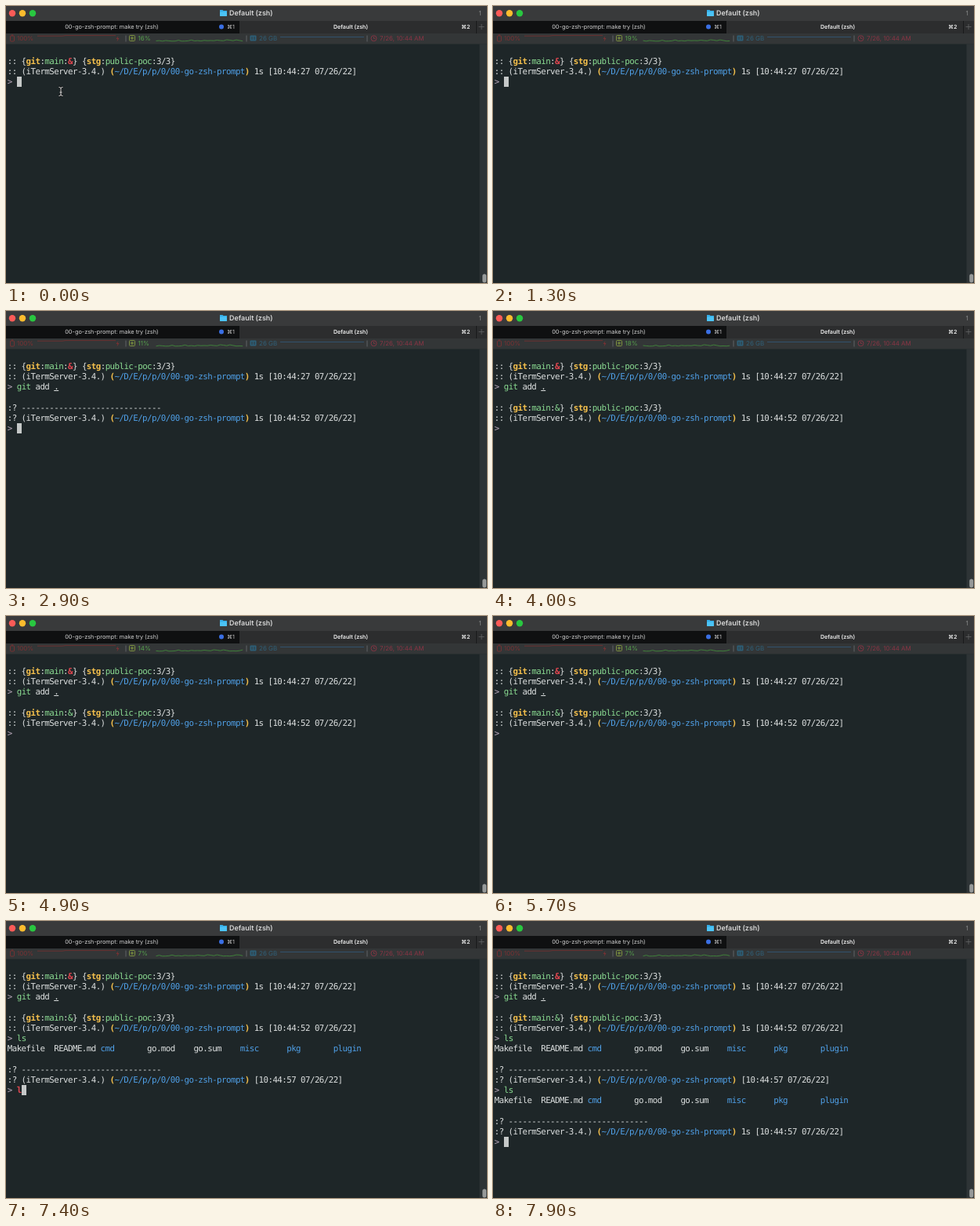
An HTML page for the animation above (8 s loop, 614 by 353 pixels).

```html
<!DOCTYPE html>
<html lang="en">
<head>
<meta charset="utf-8">
<title>Terminal</title>
<style>
html, body { margin: 0; width: 100%; height: 100%; overflow: hidden; background: #1e2628; }
svg { position: absolute; left: 0; top: 0; font-family: Inter, Roboto, sans-serif; text-rendering: geometricPrecision; }
pre {
  position: absolute; left: 1.8px; top: 64px; margin: 0; color: #dde0e0;
  font: 10.8px/13.2px "DejaVu Sans Mono", "Liberation Mono", monospace;
  letter-spacing: -.56px; text-rendering: geometricPrecision;
}
.y { color: #f5c04c; font-weight: bold }
.r { color: #e0454f; font-weight: bold }
.g { color: #8bdc92 } .b { color: #4f9fe6 } .p { color: #b9a9bb } .u { text-decoration: underline }
#cursor { position: absolute; width: 6px; height: 13px; background: #c5c8c8; }
</style>
</head>
<body>
<svg width="614" height="353" viewBox="0 0 614 353">
  <!-- title bar -->
  <rect width="614" height="19" fill="#393a3b"/>
  <circle cx="8" cy="9.2" r="4.2" fill="#fc5b57"/>
  <circle cx="21" cy="9.2" r="4.2" fill="#fdbc2e"/>
  <circle cx="34" cy="9.2" r="4.2" fill="#29c740"/>
  <path d="M273 5h3.5l1 1H282v7h-9z" fill="#35aee8"/>
  <rect x="273" y="7.5" width="9" height="5.5" rx="1" fill="#4cc3f5"/>
  <text x="285" y="12.2" font-size="8.95" font-weight="600" fill="#d9d9d9">Default (zsh)</text>
  <text x="603.5" y="12" font-size="8" fill="#8d8d8d">1</text>

  <!-- tabs -->
  <rect y="19" width="298" height="16" fill="#0f1011"/>
  <rect x="298" y="19" width="316" height="16" fill="#2c2d2e"/>
  <path d="M600.5 19v16" stroke="#191a1b"/>
  <path d="M603.5 26.5h7M607 23v7" stroke="#636465" stroke-width=".8"/>
  <g font-size="7.1">
    <text x="135" y="29.2" font-size="7.35" text-anchor="middle" fill="#cecece">00-go-zsh-prompt: make try (zsh)</text>
    <text x="440" y="29.2" text-anchor="middle" font-weight="600" fill="#f0f0f0">Default (zsh)</text>
    <text x="282" y="29.2" fill="#c4c4c4">⌘1</text>
    <text x="581" y="29.2" font-weight="600" fill="#f0f0f0">⌘2</text>
  </g>
  <circle cx="275" cy="26.5" r="3" fill="#3a6fe4"/>

  <!-- status bar -->
  <rect y="35" width="614" height="13.5" fill="#333637"/>
  <path d="M153 37.5v8M307 37.5v8M461 37.5v8" stroke="#666a6b" stroke-width=".9"/>
  <g font-size="8">
    <rect x="5.5" y="38" width="5" height="7" rx="1" fill="none" stroke="#7b3133" stroke-width=".9"/>
    <g fill="#7b3133">
      <rect x="6.8" y="36.5" width="2.4" height="1"/>
      <text x="14" y="44.4">100%</text>
      <path d="M143.5 38l-3 4h2l-1 3.5 3-4.5h-2z"/>
    </g>
    <path d="M40 38.2H72L76 37.6H140" fill="none" stroke="#7a3030" stroke-width=".8"/>
    <g fill="none" stroke="#7f9440">
      <rect x="157.5" y="37.5" width="7" height="7" rx="1"/>
      <rect x="160" y="40" width="2" height="2"/>
    </g>
    <text id="cpu" x="168.5" y="44.4" fill="#55a04c"></text>
    <path id="graph" fill="none" stroke="#418a3c" stroke-width=".9"/>
    <rect x="311.5" y="37.5" width="8" height="7" rx="1" fill="#2c5f78"/>
    <path d="M314 39v4M317 39v4" stroke="#333637"/>
    <text x="323" y="44.4" fill="#2f6079">26 GB</text>
    <path d="M350 39.5H457" stroke="#31597a" stroke-width=".8"/>
    <circle cx="469.5" cy="41.2" r="3.5" fill="none" stroke="#8b3545" stroke-width=".9"/>
    <path d="M469.5 39v2.5h1.8" fill="none" stroke="#8b3545" stroke-width=".8"/>
    <text x="477" y="44.4" font-size="7.9" fill="#8b3545">7/26, 10:44 AM</text>
  </g>

  <!-- scrollbar -->
  <rect x="604.5" y="48.5" width="9.5" height="304.5" fill="#2e3436"/>
  <rect x="608.2" y="341.5" width="5" height="11" rx="2.5" fill="#979a9a"/>
</svg>
<pre id="screen"></pre>
<div id="cursor"></div>
<svg id="mouse" width="614" height="353" fill="none">
  <path id="beam" d="M67.5 103.5q2.5 0 2.5 1.5q0-1.5 2.5-1.5M70 105v8M67.5 114.5q2.5 0 2.5-1.5q0 1.5 2.5 1.5M68.5 110h3" stroke-width="2.4" stroke="#111"/>
  <path d="M67.5 103.5q2.5 0 2.5 1.5q0-1.5 2.5-1.5M70 105v8M67.5 114.5q2.5 0 2.5-1.5q0 1.5 2.5 1.5M68.5 110h3" stroke="#ddd"/>
</svg>
<script>
const LOOP = 8000, CELL = 5.942, ROW = 13.2;
const $ = id => document.getElementById(id);
const paint = (cls, text) => `<span class="${cls}">${text}</span>`;

const waiting = ':? ' + '-'.repeat(30);
const status = amp => `:: {${paint('y', 'git')}:${paint('g', 'main')}:${paint(amp, '&amp;')}} ` +
  `{${paint('y', 'stg')}:${paint('g', 'public-poc')}:3/3}`;
const place = (mark, time, took = '1s ') => `${mark} (iTermServer-3.4.) ${paint('y', '(')}` +
  `${paint('b', '~/D/E/p/p/0/00-go-zsh-prompt')}${paint('y', ')')} ${took}[10:44:${time} 07/26/22]`;
const listing = ['Makefile', 'README.md', 'cmd', 'go.mod', 'go.sum', 'misc', 'pkg', 'plugin']
  .map(name => /^[a-z]+$/.test(name) ? paint('b', name.padEnd(10)) : name.padEnd(10)).join('');

// Each command: first key, key interval, enter, time of the next prompt.
const commands = [
  { text: 'git add .', start: 1400, step: 100, enter: 2400, done: 2600, out: [] },
  { text: 'ls', start: 6900, step: 100, enter: 7200, done: 7300, out: [listing] },
  { text: 'ls', start: 7400, step: 100, enter: 7600, done: 7700, out: [listing] }
];
const cpuSteps = [[0, 16], [1000, 19], [2000, 11], [3700, 18], [4700, 14], [6400, 8], [7200, 7]];

function highlight(typed, full) {
  const [name, ...args] = typed.split(' ');
  const cls = name === full.split(' ')[0] ? 'g' : 'r';
  const rest = args.map(a => a === '.' ? paint('u', a) : a);
  return [paint(cls, name), ...rest].join(' ');
}

function terminal(t) {
  const prompts = [
    [status('r'), place('::', 27)],
    t < 3800 ? [waiting, place(':?', 52)] : [status('g'), place('::', 52)],
    [waiting, place(':?', 57, '')],
    [waiting, place(':?', 57)]
  ];
  const rows = [];
  let col = 0;
  for (let i = 0; i < prompts.length; i++) {
    const cmd = commands[i];
    const count = cmd ? Math.max(0, Math.min(cmd.text.length, Math.floor((t - cmd.start) / cmd.step) + 1)) : 0;
    const typed = cmd ? cmd.text.slice(0, count) : '';
    rows.push(...prompts[i], paint('p', '&gt;') + ' ' + (typed && highlight(typed, cmd.text)));
    col = 2 + count;
    if (!cmd || t < cmd.enter) break;
    rows.push(...cmd.out, '');
    col = 0;
    if (t < cmd.done) break;
  }
  return { rows, col };
}

function cursorOn(t) {
  if (t < 1300) return t % 1000 < 500;
  if (t < 3000 || t >= 6900) return true;
  return (t + 900) % 1000 < 500;
}

function load(i) {
  const v = Math.abs(Math.sin(i * 12.9898) * 43758.5453) % 1;
  return v * v * 1.8;
}

function drawCpu(t) {
  const k = cpuSteps.filter(s => s[0] <= t).length - 1;
  $('cpu').textContent = cpuSteps[k][1] + '%';
  let d = '';
  for (let i = 0; i < 28; i++) {
    d += `${i ? 'L' : 'M'}${191.5 + i * 4.1} ${(44.8 - load(i + k + 5)).toFixed(1)}`;
  }
  $('graph').setAttribute('d', d);
}

const begin = performance.now();
let last = -1;
function frame() {
  const t = Math.floor((performance.now() - begin) % LOOP / 100) * 100;
  if (t !== last) {
    last = t;
    const { rows, col } = terminal(t);
    $('screen').innerHTML = rows.join('\n');
    const cursor = $('cursor').style;
    cursor.left = 2 + col * CELL + 'px';
    cursor.top = 63.4 + (rows.length - 1) * ROW + 'px';
    cursor.visibility = cursorOn(t) ? 'visible' : 'hidden';
    $('mouse').style.visibility = t < 1300 ? 'visible' : 'hidden';
    drawCpu(t);
  }
  requestAnimationFrame(frame);
}
frame();
</script>
</body>
</html>
```
